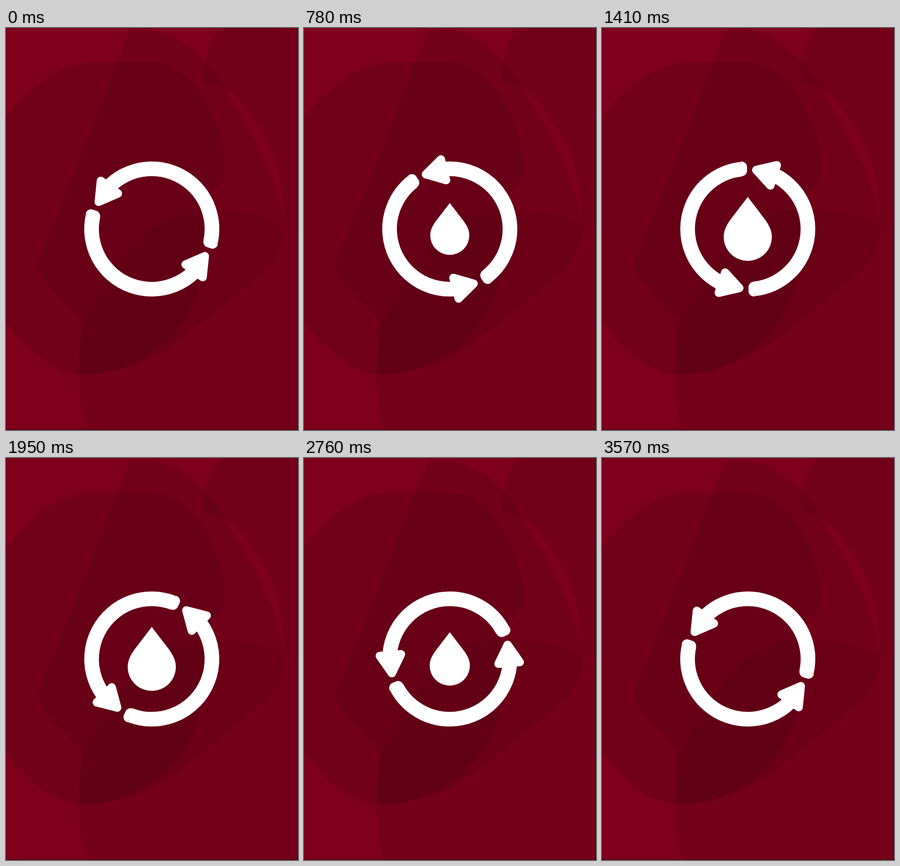
An HTML page with a canvas for the animation above (3600 ms loop, 638x878 px).

```html
<!DOCTYPE html>
<html lang="en">
<head>
<meta charset="utf-8">
<title>Water cycle</title>
<style>
  html, body { margin: 0; width: 638px; height: 878px; overflow: hidden; background: #7e001b; }
  canvas { display: block; }
</style>
</head>
<body>
<canvas id="stage" width="638" height="878"></canvas>
<script>
const ctx = document.getElementById('stage').getContext('2d');
const W = 638, H = 878;
const LOOP = 3600, STEP = 30, LAST = LOOP - STEP, GROW = 1200;
const CENTER = { x: 318.5, y: 439 };
const RADIUS = 131.5, BAND = 32;
const REST_TURN = 139.2; // turn at which the arrowhead below is upright
const rad = deg => deg * Math.PI / 180;

// Translucent background layers: [opacity, outline]
const layers = [
  [0.15, 'M0 195 C50 130 110 82 180 75 L330 76 C420 90 475 210 478 310 C476 345 440 360 428 400 C436 450 434 500 425 550 C400 680 280 760 160 757 C100 750 40 700 0 640 Z'],
  [0.15, 'M272 5 C350 -5 420 40 470 120 C530 215 600 330 606 430 C608 480 590 510 560 535 L370 690 C300 735 230 757 160 757 Q163 690 165 640 C130 595 80 560 68 520 C85 470 130 370 160 290 Q205 180 240 80 Z'],
  [0.15, 'M470 0 C440 30 430 80 437 118 C500 130 520 170 545 205 C590 270 606 330 607 440 L638 440 L638 0 Z'],
  [0.11, 'M175 878 C150 790 160 720 165 660 C200 570 300 400 420 396 C500 394 580 410 607 440 L638 440 L638 878 Z']
].map(([alpha, outline]) => [alpha, new Path2D(outline)]);

const drop = new Path2D('M0 -70 L-36 -23 C-45 -11 -52.6 2 -52.6 17 A52.6 52.6 0 0 0 52.6 17 C52.6 2 45 -11 36 -23 Z');
const head = new Path2D('M126.5 -31 L106.5 10.5 L153 7 Z');

function drawBackground() {
  ctx.fillStyle = '#7e001b';
  ctx.fillRect(0, 0, W, H);
  ctx.fillStyle = '#30000f';
  for (const [alpha, path] of layers) {
    ctx.globalAlpha = alpha;
    ctx.fill(path);
  }
  ctx.globalAlpha = 0.35;
  ctx.fillRect(0, H - 2, W, 2);
  ctx.fillRect(W - 1, 0, 1, H);
  ctx.globalAlpha = 1;
}

function drawArrow() {
  const tail = rad(157.4);
  ctx.lineWidth = BAND;
  ctx.beginPath();
  ctx.arc(0, 0, RADIUS, 0, tail - 13 / RADIUS);
  ctx.stroke();

  ctx.lineWidth = 18;
  ctx.fill(head);
  ctx.stroke(head);

  ctx.save();
  ctx.rotate(tail);
  ctx.beginPath();
  ctx.roundRect(RADIUS - BAND / 2, -14, BAND, 14, [0, 0, 12, 12]);
  ctx.fill();
  ctx.restore();
}

// Brisk start, soft landing
function ease(x) {
  const y = 1 - x;
  return 1.17 * x * y * y + 3 * x * x * y + x * x * x;
}

function render(ms) {
  const t = Math.floor((ms % LOOP + 0.01) / STEP) * STEP;
  drawBackground();
  ctx.fillStyle = ctx.strokeStyle = '#fff';
  ctx.lineJoin = 'round';

  ctx.save();
  ctx.translate(CENTER.x, CENTER.y);
  ctx.rotate(rad(180 * t / LAST - REST_TURN));
  drawArrow();
  ctx.rotate(Math.PI);
  drawArrow();
  ctx.restore();

  const size = ease(Math.max(0, Math.min(1, t / GROW, (LAST - t) / GROW)));
  if (size > 0) {
    ctx.save();
    ctx.translate(CENTER.x, CENTER.y);
    ctx.scale(size, size);
    ctx.fill(drop);
    ctx.restore();
  }
}

let start;
function tick(now) {
  start ??= now;
  render(Math.max(0, now - start));
  requestAnimationFrame(tick);
}
render(0);
requestAnimationFrame(tick);
</script>
</body>
</html>
```
